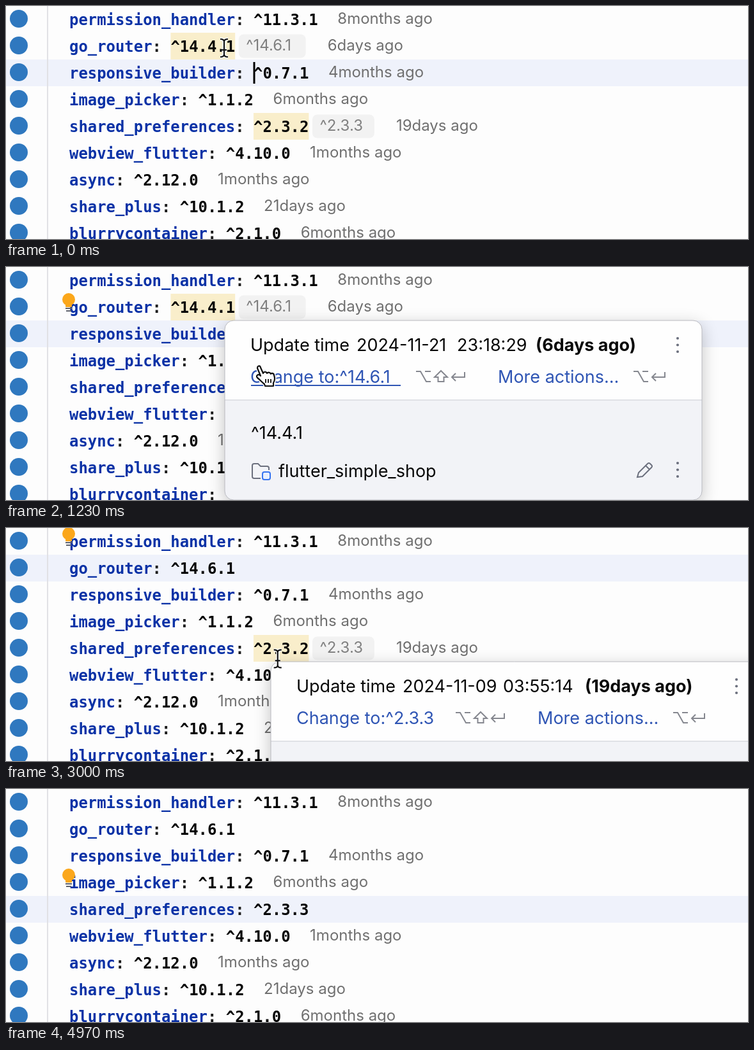
Animation of 1160x366 px, one loop 5.01 s. Source, as an HTML page with a canvas:

```html
<!DOCTYPE html>
<html lang="en">
<head>
<meta charset="utf-8">
<title>Dependency versions</title>
<style>
  html, body { margin: 0; width: 100%; height: 100%; overflow: hidden; background: #fdfdfd; }
  canvas { display: block; width: 1160px; height: 366px; }
</style>
</head>
<body>
<canvas id="stage" width="1160" height="366"></canvas>
<script>
const ctx = document.getElementById('stage').getContext('2d');
const LOOP = 5010, ROW = 42, LEFT = 99, CHAR = 14.4;
const MONO = 'bold 23.92px "DejaVu Sans Mono", monospace';
const HINT = '24px Inter, sans-serif';
const BODY = '27px Inter, sans-serif';
const STRONG = 'bold 27px Inter, sans-serif';
const GRAY = '#6f6f6f', ICON = '#6c707e', LINK = '#2f55b4';

// Moments in ms
const OPEN_1 = 230, CLICK_1 = 1500, FRESH_1 = 2250;
const OPEN_2 = 2850, CLICK_2 = 3650, FRESH_2 = 4200;
const CURSOR_GONE = 4800, BLINK = 390;

const rows = [
  { key: 'permission_handler', ver: '^11.3.1', age: '8months ago' },
  { key: 'go_router', ver: '^14.4.1', next: '^14.6.1', age: '6days ago', pill: 105, click: CLICK_1, fresh: FRESH_1 },
  { key: 'responsive_builder', ver: '^0.7.1', age: '4months ago' },
  { key: 'image_picker', ver: '^1.1.2', age: '6months ago' },
  { key: 'shared_preferences', ver: '^2.3.2', next: '^2.3.3', age: '19days ago', pill: 97, click: CLICK_2, fresh: FRESH_2 },
  { key: 'webview_flutter', ver: '^4.10.0', age: '1months ago' },
  { key: 'async', ver: '^2.12.0', age: '1months ago' },
  { key: 'share_plus', ver: '^10.1.2', age: '21days ago' },
  { key: 'blurrycontainer', ver: '^2.1.0', age: '6months ago' }
];

const popups = [
  { from: OPEN_1, to: CLICK_1, x: 342, y: 84, w: 746, date: '2024-11-21', time: '23:18:29', ago: '(6days ago)',
    agoX: 486, next: '^14.6.1', ver: '^14.4.1', linkEnd: 275, keysX: 299, moreX: 427, moreKeysX: 639 },
  { from: OPEN_2, to: CLICK_2, x: 414, y: 210, w: 766, date: '2024-11-09', time: '03:55:14', ago: '(19days ago)',
    agoX: 491, next: '^2.3.3', ver: '^2.3.2', linkEnd: 266, keysX: 289, moreX: 417, moreKeysX: 629 }
];

// Pointer stops: time, x, y
const path = [
  [0, 341, 66], [400, 339, 66], [620, 339, 66], [1020, 403, 168], [1900, 403, 168],
  [2420, 412, 187], [2900, 412, 187], [3300, 492, 303], [3800, 492, 303],
  [4280, 458, 225], [4640, 396, 118], [LOOP, 396, 118]
];

function text(str, x, y, font, color) {
  ctx.font = font;
  ctx.fillStyle = color;
  ctx.fillText(str, x, y);
}

function box(x, y, w, h, color, r = 0) {
  ctx.fillStyle = color;
  ctx.beginPath();
  ctx.roundRect(x, y, w, h, r);
  ctx.fill();
}

function dot(x, y, r, color) {
  ctx.fillStyle = color;
  ctx.beginPath();
  ctx.arc(x, y, r, 0, Math.PI * 2);
  ctx.fill();
}

function line(d, color, width) {
  ctx.strokeStyle = color;
  ctx.lineWidth = width;
  ctx.stroke(new Path2D(d));
}

function at(x, y, draw) {
  ctx.save();
  ctx.translate(x, y);
  draw();
  ctx.restore();
}

function pointerAt(t) {
  const i = path.findIndex(p => p[0] > t);
  const [t0, x0, y0] = path[i - 1], [t1, x1, y1] = path[i];
  const u = (t - t0) / (t1 - t0), e = u * u * (3 - 2 * u);
  return { x: x0 + (x1 - x0) * e, y: y0 + (y1 - y0) * e };
}

function caretAt(t) {
  if (t < CLICK_1) return { row: 2, on: t < 400 };
  const [row, start] = t < CLICK_2 ? [1, CLICK_1] : [4, CLICK_2];
  return { row, on: Math.floor((t - start) / BLINK) % 2 === 0 };
}

function bulbRow(t) {
  if (t >= 200 && t < CLICK_1) return 1;
  if (t >= 1950 && t < 3800) return 0;
  return t >= 4350 ? 3 : -1;
}

const verX = row => LEFT + (row.key.length + 2) * CHAR;

function drawRow(row, i, t) {
  const top = i * ROW, base = top + 30, x = verX(row);
  const end = x + row.ver.length * CHAR;
  const updated = row.click && t >= row.click;

  dot(20, top + 20, 14, '#2f78bf');
  if (row.next && t < row.fresh) box(x, top, end - x, ROW, '#f9eecb');
  text(row.key, LEFT, base, MONO, '#0b32a6');
  text(':', LEFT + row.key.length * CHAR, base, MONO, '#1c1c1c');
  text(updated ? row.next : row.ver, x, base, MONO, '#050505');
  if (updated) return;

  let ageX = end + 30.5;
  if (row.next) {
    box(end + 5.5, top + 2.5, row.pill, 37, '#f2f2f2', 8);
    text(row.next, end + 17, top + 28, HINT, '#808080');
    ageX = end + row.pill + 39.5;
  }
  text(row.age, ageX, top + 28, HINT, GRAY);
}

function drawBulb(row) {
  at(98, row * ROW + 9, () => {
    dot(0, 0, 10, '#fba71b');
    box(-5, 6, 10, 6, '#fba71b', 1);
    line('M-5 14H5M-4 18H4', '#5f626c', 2);
  });
}

// Key glyphs are drawn in a 24 x 20 cell
const keyPaths = {
  option: 'M0 2H7L16 18H23M14 2H23',
  shift: 'M12 1L22 11H16.5V18H7.5V11H2Z',
  enter: 'M22 3V11H2M8 5L2 11L8 17'
};

function drawKeys(names, x, y) {
  names.forEach((name, i) => at(x + i * 27, y, () => line(keyPaths[name], '#85878f', 2)));
}

function drawKebab(x, y) {
  for (const dy of [-10.5, 0, 10.5]) dot(x, y + dy, 2.1, ICON);
}

function drawFolder() {
  line('M56 248H46Q43 248 43 245V228Q43 225 46 225H52L56 229H66Q69 229 69 232V235', ICON, 2);
  box(59, 238, 12, 12, '#e7effd', 3);
  ctx.strokeStyle = '#3574f0';
  ctx.lineWidth = 2;
  ctx.stroke(new Path2D('M62 238H68Q71 238 71 241V247Q71 250 68 250H62Q59 250 59 247V241Q59 238 62 238Z'));
}

function drawPopup(p, hover) {
  at(p.x, p.y, () => {
    const h = 282;
    ctx.save();
    ctx.shadowColor = 'rgba(0,0,0,.24)';
    ctx.shadowBlur = 26;
    ctx.shadowOffsetY = 7;
    box(0, 0, p.w, h, '#fefefe', 14);
    ctx.restore();
    box(0, 125, p.w, h - 125, '#f2f3f7', [0, 0, 14, 14]);
    box(0, 124, p.w, 2, '#e0e1e6');
    ctx.strokeStyle = '#b9bac0';
    ctx.lineWidth = 1;
    ctx.beginPath();
    ctx.roundRect(0, 0, p.w, h, 14);
    ctx.stroke();

    text('Update time', 40, 48, BODY, '#080808');
    text(p.date, 206, 48, BODY, '#080808');
    text(p.time, 363, 48, BODY, '#080808');
    text(p.ago, p.agoX, 48, STRONG, '#080808');
    drawKebab(p.w - 38, 38.5);

    text('Change to:' + p.next, 40, 98, BODY, LINK);
    if (hover) box(41, 101, p.linkEnd - 41, 2, LINK);
    drawKeys(['option', 'shift', 'enter'], p.keysX, 78);
    text('More actions…', p.moreX, 98, BODY, LINK);
    drawKeys(['option', 'enter'], p.moreKeysX, 78);

    text(p.ver, 41, 186, BODY, '#080808');
    drawFolder();
    text('flutter_simple_shop', 84, 246, BODY, '#080808');
    line('M645 246L647 239L661 225Q663 223 665 225L667 227Q669 229 667 231L653 245ZM658 228L664 234', ICON, 2);
    drawKebab(p.w - 38, 234.5);
  });
}

const beam = 'M-6 -14Q0 -14 0 -10V10Q0 14 -6 14M6 -14Q0 -14 0 -10M0 10Q0 14 6 14M-4 3H4';
const hand = 'M-13 -12C-13 -16 -9 -17 -8 -13L-4 -4C-3 -7 1 -7 2 -4C3 -6 7 -6 8 -3C9 -5 13 -4 13 -1' +
  'C15 4 14 8 12 11V16H-1L-2 13C-6 10 -9 6 -13 3C-16 0 -12 -4 -8 0Z';
const arrow = 'M0 0V24L6 19L10 28L14 26L10 17.5H18Z';

function drawPointer(kind, x, y) {
  at(x, y, () => {
    ctx.lineJoin = 'round';
    if (kind === 'beam') {
      line(beam, '#fff', 5);
      line(beam, '#111', 2.2);
    } else if (kind === 'hand') {
      ctx.translate(3, 3);
      line(hand, '#fff', 5);
      ctx.fillStyle = '#fff';
      ctx.fill(new Path2D(hand));
      line(hand, '#111', 2.2);
      line('M0 5V11M4 5V11M8 5V11', '#111', 1.8);
    } else {
      line(arrow, '#fff', 4);
      ctx.fillStyle = '#111';
      ctx.fill(new Path2D(arrow));
    }
  });
}

function draw(t) {
  box(0, 0, 1160, 366, '#fdfdfd');
  const caret = caretAt(t);
  box(0, caret.row * ROW, 1160, ROW, '#eff2fb');
  box(64, 0, 2, 366, '#e1e1e5');
  rows.forEach((row, i) => drawRow(row, i, t));
  if (caret.on) box(verX(rows[caret.row]) - 0.5, caret.row * ROW + 4, 3, 34, '#000');

  const bulb = bulbRow(t);
  if (bulb >= 0) drawBulb(bulb);

  const pos = pointerAt(t);
  const popup = popups.find(p => t >= p.from && t < p.to);
  let kind = 'beam';
  if (popup) {
    if (pos.y > popup.y + 72) kind = 'hand';
    else if (pos.y > popup.y) kind = 'arrow';
    drawPopup(popup, kind === 'hand');
  }
  if (t < CURSOR_GONE) drawPointer(kind, pos.x, pos.y);
}

const start = performance.now();
function tick() {
  draw((performance.now() - start) % LOOP);
  requestAnimationFrame(tick);
}
tick();
</script>
</body>
</html>
```
